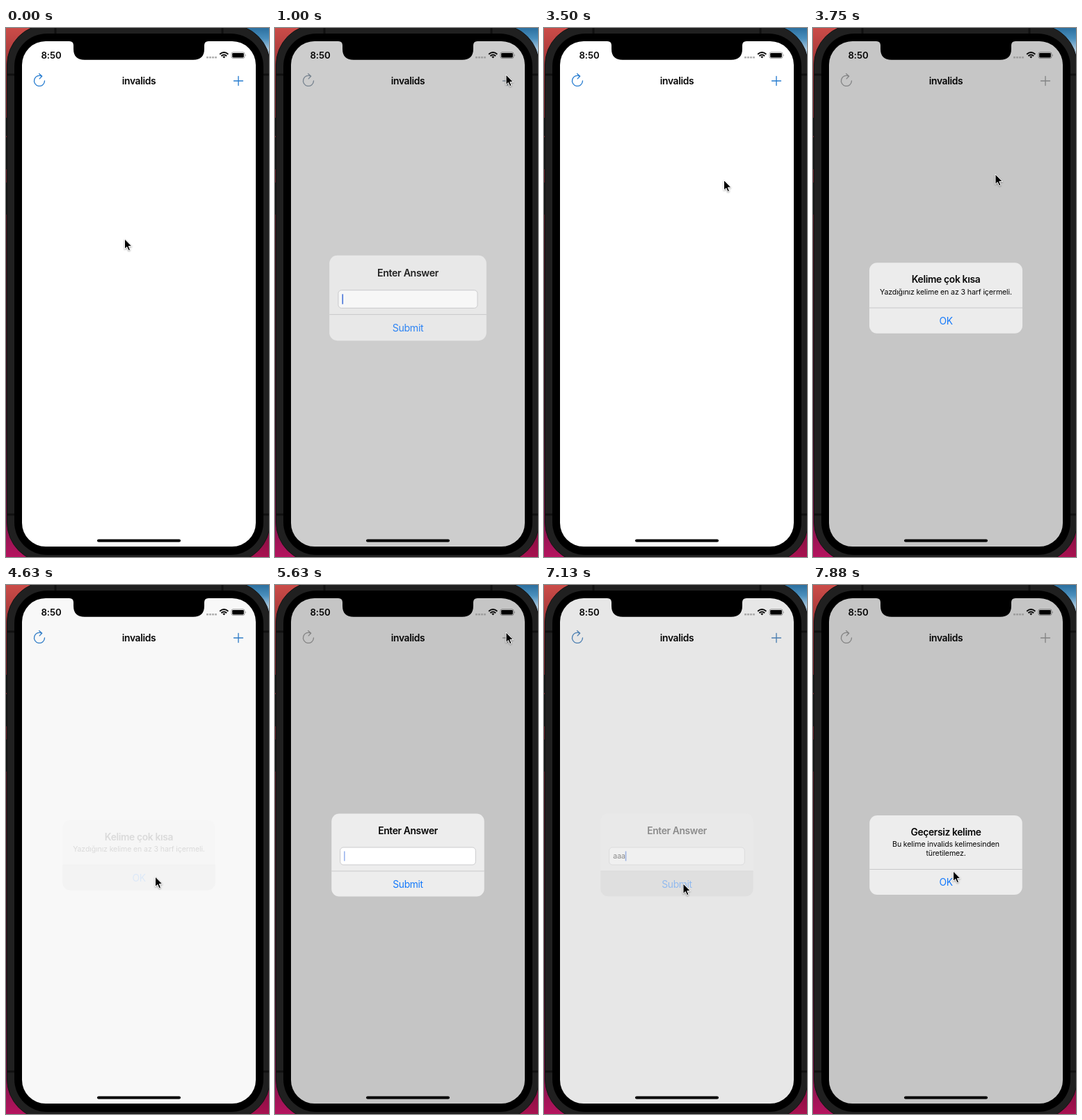
An HTML page that plays this animation: 378 by 760 pixels, repeating every 8000 ms.

```html
<!DOCTYPE html>
<html lang="en">
<head>
<meta charset="utf-8">
<title>Word game</title>
<style>
  html, body { margin: 0; width: 100%; height: 100%; overflow: hidden; background: #1f1f1f; }
  svg { display: block; width: 100vw; height: 100vh; }
  text { font-family: Inter, "Liberation Sans", sans-serif; font-size: 13.8px; letter-spacing: -0.33px; fill: #050505; }
  .bold { font-weight: 600; }
  .mid { text-anchor: middle; }
  .small { font-size: 10.6px; letter-spacing: -0.13px; }
  .action { fill: #1479fb; }
</style>
</head>
<body>
<svg viewBox="0 0 378 760" preserveAspectRatio="none">
  <defs>
    <linearGradient id="left" x2="0" y2="1">
      <stop stop-color="#cb4c48"/><stop offset=".1" stop-color="#8f2a30"/>
      <stop offset=".4" stop-color="#4b1420"/><stop offset=".75" stop-color="#3a0d20"/>
      <stop offset=".95" stop-color="#8f1450"/><stop offset="1" stop-color="#b5135e"/>
    </linearGradient>
    <linearGradient id="right" x2="0" y2="1">
      <stop stop-color="#2b6f9f"/><stop offset=".02" stop-color="#4a8fbd"/>
      <stop offset=".04" stop-color="#a9c6dc"/><stop offset=".1" stop-color="#333"/>
      <stop offset=".9" stop-color="#5c0e30"/><stop offset="1" stop-color="#a81150"/>
    </linearGradient>
    <clipPath id="screen"><rect x="23" y="19" width="336" height="726" rx="34"/></clipPath>
  </defs>

  <rect width="190" height="760" fill="url(#left)"/>
  <rect x="190" width="188" height="760" fill="url(#right)"/>
  <path d="M0 129h3v26h-3zM0 157h3v46h-3zM0 222h3v46h-3z" fill="#161616"/>
  <rect x="1.5" y="-5" width="378" height="773" rx="58" fill="#202020" stroke="#141414"/>
  <path d="M2 67h10M2 699h10M71 0v8M311 0v8M370 67h8M370 699h8" stroke="#101010" stroke-width="3"/>
  <rect x="12" y="8" width="358" height="749" rx="47"/>

  <g clip-path="url(#screen)">
    <rect x="23" y="19" width="336" height="726" fill="#fff"/>
    <rect id="dim" x="23" y="19" width="336" height="726" fill="#000"/>
  </g>
  <path d="M91 18.5V19Q97 19 97 25V30Q97 45.700 113 45.700H269Q285 45.700 285 30V25Q285 19 291 19V18.500Z"/>

  <text class="bold" x="50.500" y="43.700" style="font-size:13.200px;letter-spacing:-.1px">8:50</text>
  <path d="M288 42.300H303" stroke="#888" stroke-opacity=".65" stroke-width="2.400" stroke-dasharray="3 1"/>
  <g fill="none" stroke="#080808" stroke-width="1.900">
    <path d="M307.200 37.800Q313.300 32.300 319.400 37.800M309.400 40.200Q313.300 36.700 317.200 40.200"/>
    <path d="M311.300 41.200Q313.300 39.600 315.300 41.200L313.300 43.500Z" fill="#080808" stroke="none"/>
  </g>
  <rect x="324" y="34.800" width="19" height="8.800" rx="2.500" fill="none" stroke="#000" stroke-opacity=".45" stroke-width=".8"/>
  <rect x="325.200" y="36" width="16.600" height="6.400" rx="1.300"/>
  <path d="M344.200 37.800q1.500 1.400 0 2.800z" fill="#000" fill-opacity=".5"/>

  <text class="bold mid" x="191" y="80.600">invalids</text>
  <g id="icons" fill="none" stroke-width="1.350" stroke-linecap="round" stroke-linejoin="round">
    <path d="M51.500 69.300A7.500 7.500 0 1 0 55.500 76M47.700 65.700L51.700 69.200L48.200 72.900"/>
    <path d="M327.500 76H340.500M334 69.500V82.500"/>
  </g>
  <rect x="131" y="734.500" width="120" height="4" rx="2"/>

  <g id="alerts"></g>
  <g id="cursor" style="filter:drop-shadow(0 1px 1px rgba(0,0,0,.35))">
    <path d="M0 0V14.500L3.300 11.500L5.600 16.700L8 15.700L5.800 10.600H10.400Z" stroke="#fff" stroke-width="1"/>
  </g>
</svg>
<script>
const LOOP = 8000, STEP = 125, FADE = 250, WIDTH = 219.5;
const $ = id => document.getElementById(id);

const alerts = [
  { height: 119, title: 'Enter Answer', button: 'Submit', show: 880, hide: 3130, press: 2800,
    typed: 'in', keys: [1500, 1750] },
  { height: 101, title: 'Kelime çok kısa', button: 'OK', show: 3560, hide: 4498, press: 4350,
    lines: ['Yazdığınız kelime en az 3 harf içermeli.'] },
  { height: 119, title: 'Enter Answer', button: 'Submit', show: 5380, hide: 7060, press: 6860,
    typed: 'aaa', keys: [5950, 6100, 6250] },
  { height: 114, title: 'Geçersiz kelime', button: 'OK', show: 7400, hide: 9000, press: 9000,
    lines: ['Bu kelime invalids kelimesinden', 'türetilemez.'] }
];

// time, x, y of the pointer tip
const pointer = [
  [0, 170.5, 303], [130, 170.5, 303], [450, 250, 180], [750, 332, 67], [1880, 332, 67],
  [2250, 265, 250], [2630, 199, 429], [3080, 199, 429], [3500, 258.5, 218.5], [3700, 262, 210],
  [3850, 262, 210], [4250, 214.5, 419], [4640, 214.5, 419], [5150, 332, 68], [6125, 332, 68],
  [6375, 259.5, 207.5], [6750, 200, 429], [7150, 200, 429], [7750, 201.5, 411], [8000, 201.5, 411]
];

const slope = (i, c) => (pointer[i + 1][c] - pointer[i][c]) / (pointer[i + 1][0] - pointer[i][0]);

// Tangent is flat at rests and turning points, so the curve never overshoots.
function tangent(i, c) {
  if (i === 0 || i === pointer.length - 1) return 0;
  const a = slope(i - 1, c), b = slope(i, c);
  return a * b <= 0 ? 0 : 2 * a * b / (a + b);
}

function pointerAt(t, c) {
  const i = Math.max(0, pointer.findIndex(p => p[0] > t) - 1);
  const [a, b] = [pointer[i], pointer[i + 1]], d = b[0] - a[0], u = (t - a[0]) / d;
  const v = u * u * (3 - 2 * u);
  return a[c] + (b[c] - a[c]) * v
    + d * u * (1 - u) * (tangent(i, c) * (1 - u) - tangent(i + 1, c) * u);
}

function buildAlert(a) {
  const top = -a.height / 2, bottom = a.height / 2, left = -WIDTH / 2;
  const label = (y, cls, s) => `<text class="mid ${cls}" y="${y}">${s}</text>`;
  const box = `x="${left}" y="${top}" width="${WIDTH}" height="${a.height}" rx="11"`;
  const field = a.typed ? `
    <rect x="-97.300" y="${top + 48.5}" width="194.600" height="25" rx="4.500" fill="#fff" stroke="#c6c6c8" stroke-width=".9"/>
    <text class="small typed" x="-91.700" y="${top + 64.9}"></text>
    <rect class="caret" y="${top + 54}" width="1.600" height="14" fill="#3568dc"/>` : '';
  const g = document.createElementNS('http://www.w3.org/2000/svg', 'g');
  g.innerHTML = `<rect ${box} fill="#ededed"/>
    <path class="pressed" fill="#d5d5d5" d="M${left} ${bottom - 36.5}h${WIDTH}v25.500a11 11 0 0 1 -11 11h${22 - WIDTH}a11 11 0 0 1 -11 -11z"/>
    <path d="M${left} ${bottom - 36.5}h${WIDTH}" stroke="#c4c4c6" stroke-width=".9"/>
    ${label(top + 29, 'bold', a.title)}
    ${(a.lines || []).map((s, i) => label(top + 45.3 + i * 13, 'small', s)).join('')}
    ${field}${label(bottom - 12.9, 'action', a.button)}`;
  $('alerts').append(g);
  a.node = g;
  a.part = name => g.querySelector('.' + name);
}

const easeOut = (t, start) => 1 - (1 - Math.min(1, Math.max(0, (t - start) / FADE))) ** 3;

function updateAlert(a, t) {
  const shown = easeOut(t, a.show), level = shown * (1 - easeOut(t, a.hide));
  a.node.setAttribute('opacity', level);
  a.node.setAttribute('transform', `translate(191 388) scale(${1 + 0.2 * (1 - shown)})`);
  a.part('pressed').setAttribute('opacity', t >= a.press ? 1 : 0);
  if (a.typed) {
    const count = a.keys.filter(k => k <= t).length;
    const text = a.part('typed'), caret = a.part('caret');
    text.textContent = a.typed.slice(0, count);
    const last = count ? a.keys[count - 1] : a.show;
    caret.setAttribute('x', -92 + (count ? text.getComputedTextLength() + 0.3 : 0));
    const blink = 0.45 + 1.2 * Math.cos((t - last) / 1000 * 2 * Math.PI);
    caret.setAttribute('opacity', Math.min(1, Math.max(0, blink)));
  }
  return level;
}

function render(t) {
  const level = Math.max(...alerts.map(a => updateAlert(a, t)));
  const mix = (from, to) => Math.round(from + (to - from) * level);
  $('dim').setAttribute('opacity', 0.2275 * level);
  $('icons').setAttribute('stroke', `rgb(${mix(38, 132)},${mix(124, 132)},${mix(208, 132)})`);
  $('cursor').setAttribute('transform', `translate(${pointerAt(t, 1)} ${pointerAt(t, 2)})`);
}

alerts.forEach(buildAlert);
const start = performance.now();
function tick() {
  const t = (performance.now() - start) % LOOP;
  render(Math.floor((t + 5) / STEP) * STEP % LOOP);
  requestAnimationFrame(tick);
}
tick();
</script>
</body>
</html>
```
